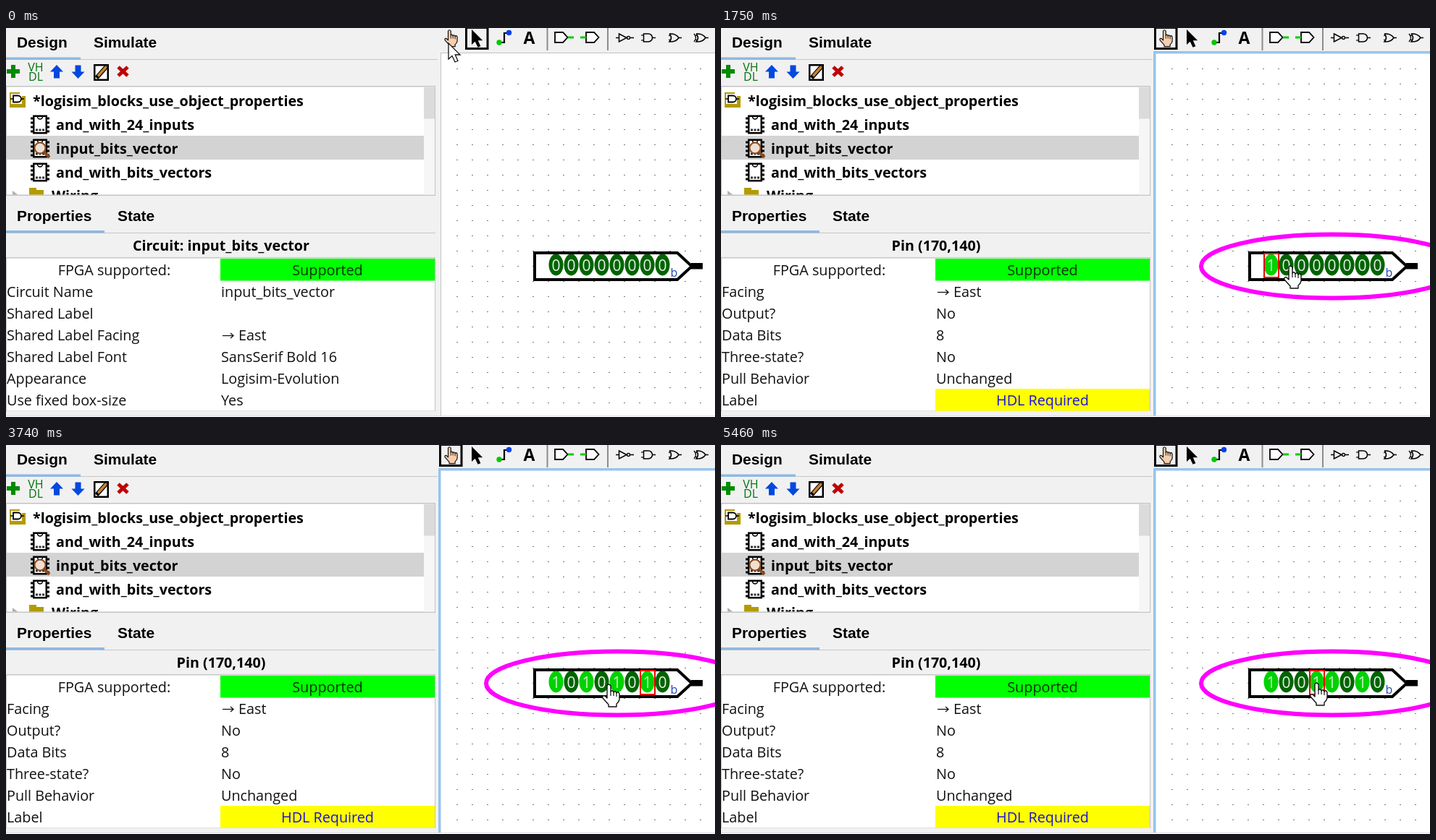
These frames come from a looping animation (979x538 px, 5920 ms). An HTML page with a canvas:

```html
<!DOCTYPE html>
<html lang="en">
<head>
<meta charset="utf-8">
<title>Toggling bits of an input pin</title>
<style>
html, body { margin: 0; width: 100%; height: 100%; overflow: hidden; background: #fff; }
canvas { display: block; }
</style>
</head>
<body>
<canvas id="stage" width="979" height="538"></canvas>
<script>
const c = document.getElementById('stage').getContext('2d');
const LOOP = 5920;
const UI = '"Open Sans", "Noto Sans", sans-serif';
const TAB = '"Liberation Sans", Arial, sans-serif';
const GRAY = '#f1f1f1', OLIVE = '#b39b00', FOCUS = '#98c4ec';

const FOCUS_AT = 210, PIN_AT = 1270;
// [time, bit index]
const CLICKS = [[PIN_AT, 0], [2130, 2], [2730, 4], [3400, 6], [4360, 2], [4990, 3]];
// [first step, last step, step count, evenly spaced points]
const MOVES = [
  [60, 60, 1, [[610, 19]]],
  [540, 1080, 9, [[626, 48], [678, 150], [730, 255], [758, 314], [763, 325]]],
  [1610, 1990, 6, [[768, 326], [786, 328], [804, 329], [813, 329], [806, 329], [801, 329]]],
  [2450, 2800, 6, [[820, 328], [841, 328], [846, 329]]],
  [3140, 3470, 6, [[868, 328], [892, 329], [894, 330]]],
  [3740, 3880, 3, [[832, 330], [823, 330], [821, 330]]],
  [4090, 4420, 6, [[800, 328], [790, 326], [799, 326]]],
  [4690, 5060, 6, [[806, 326], [817, 326], [814, 326]]],
  [5330, 5460, 3, [[822, 328]]]
];

const PROPS = {
  circuit: ['Circuit: input_bits_vector', [
    ['Circuit Name', 'input_bits_vector'], ['Shared Label', ''],
    ['Shared Label Facing', '>East'], ['Shared Label Font', 'SansSerif Bold 16'],
    ['Appearance', 'Logisim-Evolution'], ['Use fixed box-size', 'Yes']]],
  pin: ['Pin (170,140)', [
    ['Facing', '>East'], ['Output?', 'No'], ['Data Bits', '8'],
    ['Three-state?', 'No'], ['Pull Behavior', 'Unchanged'], ['Label', '']]]
};

function rect(x, y, w, h, color) {
  c.fillStyle = color;
  c.fillRect(x, y, w, h);
}

function text(s, x, y, font, color = '#111', align = 'left') {
  c.font = font;
  c.fillStyle = color;
  c.textAlign = align;
  c.fillText(s, x, y);
}

const plain = (s, x, y, color, align) => text(s, x, y, '19.8px ' + UI, color, align);
const bold = (s, x, y, align) => text(s, x, y, 'bold 19.7px ' + UI, '#000', align);
const tab = (s, x, y) => text(s, x, y, 'bold 20.9px ' + TAB, '#000');

function paint(fill, stroke, width = 2) {
  if (fill) { c.fillStyle = fill; c.fill(); }
  if (stroke) { c.strokeStyle = stroke; c.lineWidth = width; c.stroke(); }
}

function poly(points, fill, stroke, width, open) {
  c.beginPath();
  for (let i = 0; i < points.length; i += 2) c.lineTo(points[i], points[i + 1]);
  if (!open) c.closePath();
  paint(fill, stroke, width);
}

const line = (points, color, width) => poly(points, null, color, width, true);

function oval(x, y, rx, ry, fill, stroke, width) {
  c.beginPath();
  c.ellipse(x, y, rx, ry, 0, 0, 7);
  paint(fill, stroke, width);
}

function at(x, y, scale, draw) {
  c.save();
  c.translate(x, y);
  c.scale(scale, scale);
  draw();
  c.restore();
}

// Pointing hand with the fingertip at the origin
function hand(x, y, scale, fill, width) {
  at(x, y, scale, () => {
    c.lineJoin = 'round';
    c.beginPath();
    c.moveTo(-2, 3);
    c.quadraticCurveTo(0, -1, 3, 3);
    c.lineTo(3, 11);
    for (const k of [0, 1, 2]) {
      c.quadraticCurveTo(5 + k * 4, 8 + k, 7 + k * 4, 12 + k);
    }
    c.lineTo(15, 22);
    c.quadraticCurveTo(14, 26, 11, 28);
    c.lineTo(11, 32);
    c.lineTo(0, 32);
    c.lineTo(0, 29);
    c.lineTo(-8, 20);
    c.quadraticCurveTo(-9, 16, -5, 17);
    c.lineTo(-2, 20);
    c.closePath();
    paint(fill, '#111', width);
    line([3, 11, 3, 17], '#111', 1.2);
    line([7, 12, 7, 17], '#111', 1.2);
    line([11, 13, 11, 18], '#111', 1.2);
    c.lineJoin = 'miter';
  });
}

function arrow(x, y, scale, fill, stroke) {
  at(x, y, scale, () =>
    poly([0, 0, 0, 22, 5, 17.5, 9, 26, 13, 24.5, 9.2, 16, 16, 16], fill, stroke, 1.3));
}

function andGate(x, y, w, r, fill, width) {
  c.beginPath();
  c.moveTo(x, y - r);
  c.lineTo(x + w - r, y - r);
  c.arc(x + w - r, y, r, -Math.PI / 2, Math.PI / 2);
  c.lineTo(x, y + r);
  c.closePath();
  paint(fill, '#000', width);
}

function orGate(x, y) {
  c.beginPath();
  c.moveTo(x, y - 5.5);
  c.quadraticCurveTo(x + 9, y - 6, x + 13, y);
  c.quadraticCurveTo(x + 9, y + 6, x, y + 5.5);
  c.quadraticCurveTo(x + 5, y, x, y - 5.5);
  paint(null, '#000', 1.5);
  line([x - 1, y - 3, x + 2, y - 3], '#000', 1.2);
  line([x - 1, y + 3, x + 2, y + 3], '#000', 1.2);
  line([x + 13, y, x + 17, y], '#000', 1.5);
}

function chip(y) {
  for (let k = 0; k < 4; k++) rect(34, y - 10 + k * 6, 26, 3, '#000');
  rect(37, y - 13, 20, 26, '#000');
  rect(39.5, y - 10.5, 15, 21, '#fff');
  c.beginPath();
  c.arc(47, y - 11, 3.5, 0, Math.PI);
  paint(null, '#000', 1.5);
  for (let k = 0; k < 3; k++) rect(41 + k * 4.5, y + 6, 3, 3, '#333');
}

function blueArrow(x, dir) {
  at(x, 60.5, 1, () => {
    c.scale(1, dir);
    poly([0, -9.5, 9, 0, 4, 0, 4, 9, -4, 9, -4, 0, -9, 0], '#0048e0');
  });
}

function drawToolIcons() {
  rect(1, 57, 18, 6, '#008a00');
  rect(7, 51, 6, 18, '#008a00');
  text('VH', 41, 60, '16px ' + UI, '#00740c', 'center');
  text('DL', 41, 73, '16px ' + UI, '#00740c', 'center');
  blueArrow(70, 1);
  blueArrow(99.5, -1);
  rect(121, 50, 21, 23, '#000');
  rect(123.5, 52.5, 16, 18, '#fff');
  line([125, 69, 139, 53], '#000', 6);
  line([127, 66.5, 138.5, 53.5], '#c98232', 3.5);
  line([155, 54, 168, 66], '#c00000', 5);
  line([168, 54, 155, 66], '#c00000', 5);
}

function drawTree() {
  rect(0, 80, 593, 152, '#c3c3c3');
  rect(1, 81.5, 591, 149, '#fff');
  rect(577, 81.5, 15, 149, '#f6f6f6');
  rect(577, 81.5, 15, 44, '#dbdbdb');
  rect(1, 149, 576, 33, '#d3d3d3');
  poly([5, 89, 19, 89, 19, 94, 27, 94, 27, 110, 5, 110], OLIVE);
  rect(7, 91, 15, 14, '#fff');
  andGate(10, 98, 11, 4.5, '#fff', 1.8);
  line([6, 98, 10, 98], '#000', 1.5);
  line([21, 98, 25, 98], '#000', 1.5);
  bold('*logisim_blocks_use_object_properties', 37, 108);
  ['and_with_24_inputs', 'input_bits_vector', 'and_with_bits_vectors'].forEach((name, i) => {
    chip(133.5 + i * 33);
    bold(name, 69, 141 + i * 33);
  });
  line([52, 171, 60, 179], '#8a4a1c', 4);
  oval(47, 166, 7.5, 7.5, '#f1dfd2', '#8a4a1c', 2);
  c.save();
  c.beginPath();
  c.rect(1, 81, 576, 149.5);
  c.clip();
  poly([32, 221, 42, 221, 42, 224, 52, 224, 52, 240, 32, 240], OLIVE);
  poly([9, 225, 17, 231, 9, 237], '#b0b0b0');
  bold('Wiring', 63, 239);
  c.restore();
}

function drawProps(selected) {
  const [title, rows] = selected ? PROPS.pin : PROPS.circuit;
  bold(title, 297, 308, 'center');
  rect(0, 317, 593, 213, '#c6c6c6');
  rect(1, 318.5, 591, 211, '#fff');
  plain('FPGA supported:', 149.5, 342, '#111', 'center');
  rect(296, 319, 296, 30.5, '#00ff00');
  plain('Supported', 444, 342, '#063006', 'center');
  rows.forEach(([key, value], i) => {
    const y = 372 + i * 30, east = value[0] === '>';
    plain(key, 1, y);
    plain(east ? value.slice(1) : value, east ? 321 : 297, y);
    if (east) {
      line([299, y - 6.5, 314, y - 6.5], '#111', 1.3);
      line([310, y - 10, 314, y - 6.5, 310, y - 3], '#111', 1.3);
    }
  });
  if (selected) {
    rect(296, 499, 296, 30.5, '#ffff00');
    plain('HDL Required', 444, 522, '#1a12d8', 'center');
  }
}

function drawLeft(selected) {
  rect(0, 0, 600, 536, GRAY);
  tab('Design', 15, 27);
  tab('Simulate', 121, 27);
  rect(0, 43, 596, 1, '#c6c6c6');
  rect(0, 40.5, 103, 3.5, '#8fb8e0');
  drawToolIcons();
  drawTree();
  tab('Properties', 15, 267);
  tab('State', 154, 267);
  rect(0, 283, 593, 1, '#c6c6c6');
  rect(0, 280, 136, 3.5, '#8fb8e0');
  drawProps(selected);
}

function drawToolbar(poke) {
  rect(596, 0, 383, 35, GRAY);
  c.strokeStyle = '#000';
  c.lineWidth = 3;
  c.strokeRect(poke ? 599.5 : 635.5, -0.5, 29.5, 29);
  hand(612, 2, 0.74, '#f8cfae', 1.6);
  arrow(643, 2, 0.95, '#000');
  line([682, 20, 688, 20, 688, 7, 694, 7], '#000', 2.2);
  oval(681, 20, 3.7, 3.7, '#00c800');
  oval(694.5, 6.5, 3.7, 3.7, '#0040f0');
  text('A', 722.5, 22, 'bold 23px ' + UI, '#000', 'center');
  for (const x of [746.5, 830]) rect(x, 0, 2, 31, '#8c8c8c');
  for (const x of [758, 801]) {
    poly([x, 6, x + 11, 6, x + 17.5, 13, x + 11, 20, x, 20], '#fff', '#000', 1.8);
    rect(x === 758 ? 776 : 793, 11.5, 8, 3, '#00d000');
  }
  poly([846.5, 8, 857, 13.5, 846.5, 19], null, '#000', 1.5);
  line([842, 13.5, 846, 13.5], '#000', 1.5);
  oval(859.5, 13.5, 2, 2, null, '#000', 1.3);
  line([861.5, 13.5, 867, 13.5], '#000', 1.5);
  andGate(880.5, 13.5, 12, 5.5, null, 1.5);
  line([877, 10, 880, 10], '#000', 1.2);
  line([877, 17, 880, 17], '#000', 1.2);
  line([893, 13.5, 897, 13.5], '#000', 1.5);
  orGate(916, 13.5);
  orGate(953, 13.5);
  c.beginPath();
  c.moveTo(950, 8);
  c.quadraticCurveTo(955, 13.5, 950, 19);
  paint(null, '#000', 1.4);
}

function drawPin(t) {
  const bits = Array(8).fill(0);
  let active = -1;
  for (const [time, bit] of CLICKS) {
    if (t >= time) { bits[bit] ^= 1; active = bit; }
  }
  poly([730, 311, 927, 311, 947, 329.5, 927, 348, 730, 348], '#fff', '#000', 4);
  rect(946, 325, 16, 8.5, '#000');
  bits.forEach((on, i) => {
    const x = 759.5 + 21 * i;
    oval(x, 327.5, 10, 15, on ? '#00d200' : '#006400');
    text(on, x, 336, '21px ' + UI, on ? '#c4f4c4' : '#e6f0e6', 'center');
  });
  text('b', 922.5, 344, '16px ' + UI, '#2244b4', 'center');
  if (active >= 0) {
    c.strokeStyle = '#f00000';
    c.lineWidth = 2;
    c.strokeRect(750 + 21 * active, 312, 20, 33);
  }
}

function drawCircuit(t) {
  const focused = t >= FOCUS_AT;
  rect(600, 35, 379, 501, '#fff');
  for (let y = 56; y < 535; y += 21) {
    for (let x = 622; x < 979; x += 21) rect(x, y, 2, 1, '#777');
  }
  if (focused) {
    rect(597, 32, 3.5, 504, FOCUS);
    rect(597, 32, 382, 3.5, FOCUS);
  } else {
    rect(600, 34, 1, 502, '#c3c3c3');
    rect(600, 34, 379, 1, '#c3c3c3');
  }
  drawPin(t);
  if (t >= PIN_AT) oval(844, 329.5, 181, 44, null, '#ff00ff', 6);
}

function cursorAt(t) {
  let pos = [611, 21];
  for (const [start, end, steps, points] of MOVES) {
    if (t < start) break;
    const gap = (end - start) / Math.max(1, steps - 1) || 1;
    const step = Math.min(steps, Math.floor((t - start) / gap + 0.05) + 1);
    const path = [pos, ...points];
    const u = step / steps * points.length;
    const i = Math.min(points.length - 1, Math.floor(u));
    pos = path[i].map((v, k) => v + (path[i + 1][k] - v) * (u - i));
  }
  return pos.map(Math.round);
}

function draw(t) {
  rect(0, 0, 979, 538, '#fff');
  drawLeft(t >= PIN_AT);
  drawToolbar(t >= FOCUS_AT);
  drawCircuit(t);
  rect(0, 536, 979, 1, '#dedede');
  const [x, y] = cursorAt(t);
  if (y < 36) arrow(x, y, 1, '#fff', '#111');
  else hand(x, y, 1, '#fff', 1.4);
}

const began = performance.now();
function tick() {
  draw((performance.now() - began) % LOOP);
  requestAnimationFrame(tick);
}
tick();
</script>
</body>
</html>
```
